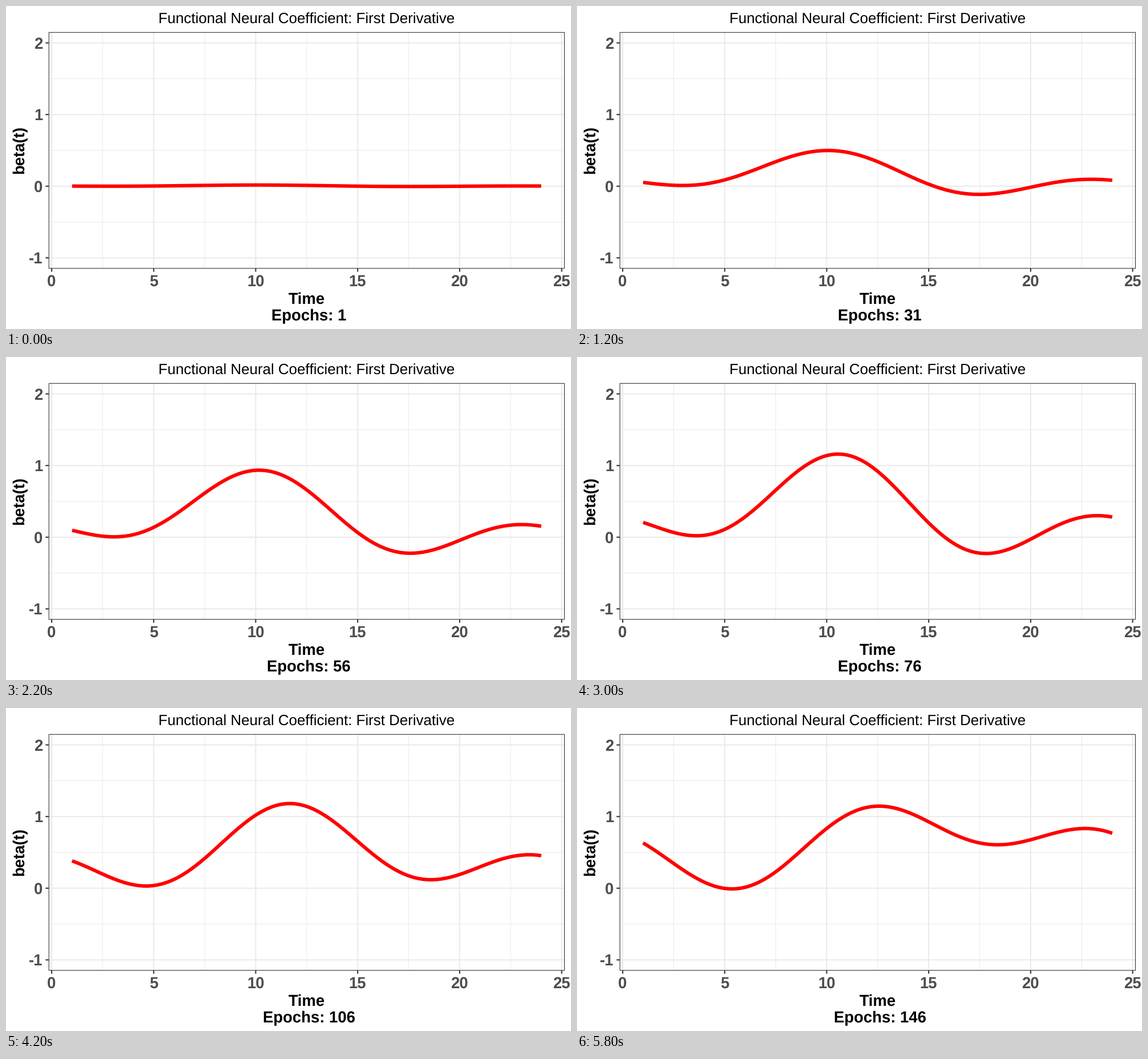
A matplotlib script that plays this animation: 990 by 566 pixels, repeating every 6000 ms.

```python
import numpy as np
import matplotlib.pyplot as plt
from matplotlib.animation import FuncAnimation
from matplotlib.patches import Rectangle

W, H, DPI = 990, 566, 100
FRAMES, INTERVAL = 30, 200
PT = 72 / DPI

LEFT, RIGHT, TOP, BOTTOM = 74.7, 979, 45.8, 460.2
GRID, DARK, LABEL = "#ebebeb", "#333333", "#4d4d4d"
EPOCH_STEP = 5
LAST_EPOCH = 1 + EPOCH_STEP * (FRAMES - 1)
T = np.linspace(1, 24, 100)

plt.rcParams.update({
    "font.family": "Liberation Sans",
    "text.hinting": "none",
    "text.kerning_factor": 6,
    "path.snap": False,
})


def px(t):
    return LEFT + (t + .15) * (RIGHT - LEFT) / 25.3


def py(b):
    return BOTTOM - (b + 1.15) * (BOTTOM - TOP) / 3.3


def logistic(x):
    return 1 / (1 + np.exp(-x))


def bump(s, center, width):
    return np.exp(-.5 * ((s - center) / width) ** 2)


def beta(epoch):
    """Level plus two harmonics whose amplitude and phase drift in training."""
    s = epoch / LAST_EPOCH
    level = .63 * s + .1 * s * s * (1 - s)
    amp1 = .352 * np.tanh(s / .35) + .145 * bump(s, .465, .13)
    amp2 = .328 * np.tanh(s / .45) + .115 * bump(s, .53, .15)
    phase1 = np.radians(122 + 112 * logistic(10 * (s - .77)))
    phase2 = np.radians(-79.5 + 42 * logistic(13 * (s - .575)))
    a = 2 * np.pi * (T - 1) / 24
    return level + amp1 * np.cos(a - phase1) + amp2 * np.cos(2 * a - phase2)


fig = plt.figure(figsize=(W / DPI, H / DPI), dpi=DPI, facecolor="white")
ax = fig.add_axes([0, 0, 1, 1])
ax.set_xlim(0, W)
ax.set_ylim(H, 0)
ax.axis("off")


def line(xs, ys, color, width, z):
    return ax.plot(xs, ys, color=color, lw=width * PT, zorder=z,
                   solid_capstyle="butt", solid_joinstyle="round")[0]


def text(x, y, s, size=27.58, color="black", weight="bold", ha="center", **kw):
    return ax.text(x, y, s, fontsize=size * PT, color=color, weight=weight,
                   ha=ha, va="baseline", **kw)


def v_grid(t, width, z):
    line([px(t)] * 2, [TOP, BOTTOM], GRID, width, z)


def h_grid(b, width, z):
    line([LEFT, RIGHT], [py(b)] * 2, GRID, width, z)


for t in np.arange(2.5, 25, 5):
    v_grid(t, 1.05, 1)
for b in np.arange(-.5, 2):
    h_grid(b, 1.05, 1)

for t in range(0, 26, 5):
    v_grid(t, 2.1, 2)
    line([px(t)] * 2, [BOTTOM, BOTTOM + 5.4], DARK, 2.1, 5)
    text(px(t) - .3, 490.4, str(t), color=LABEL)
for b in range(-1, 3):
    h_grid(b, 2.1, 2)
    line([LEFT - 5.4, LEFT], [py(b)] * 2, DARK, 2.1, 5)
    text(64.2, py(b) + 10, str(b), color=LABEL, ha="right")

ax.add_patch(Rectangle((LEFT + .5, TOP + .5), RIGHT - LEFT - 1, BOTTOM - TOP - 1,
                       fill=False, ec=DARK, lw=1.1 * PT, zorder=4))

text(526.7, 30.4, "Functional Neural Coefficient: First Derivative",
     size=25.9, weight="normal")
text(527.2, 521.4, "Time")
text(31.2, 252, "beta(t)", rotation=90, rotation_mode="anchor")
counter = text(465, 551.2, "", ha="left")
curve = line(px(T), py(0 * T), "red", 6.1, 3)


def update(i):
    label = str(1 + EPOCH_STEP * i)
    curve.set_ydata(py(beta(int(label))))
    counter.set_text("Epochs: " + label)
    counter.set_x(465 - 7.67 * (len(label) - 1))
    return curve, counter


anim = FuncAnimation(fig, update, frames=FRAMES, interval=INTERVAL,
                     init_func=lambda: update(0), repeat=True, repeat_delay=0)
plt.show()
```
